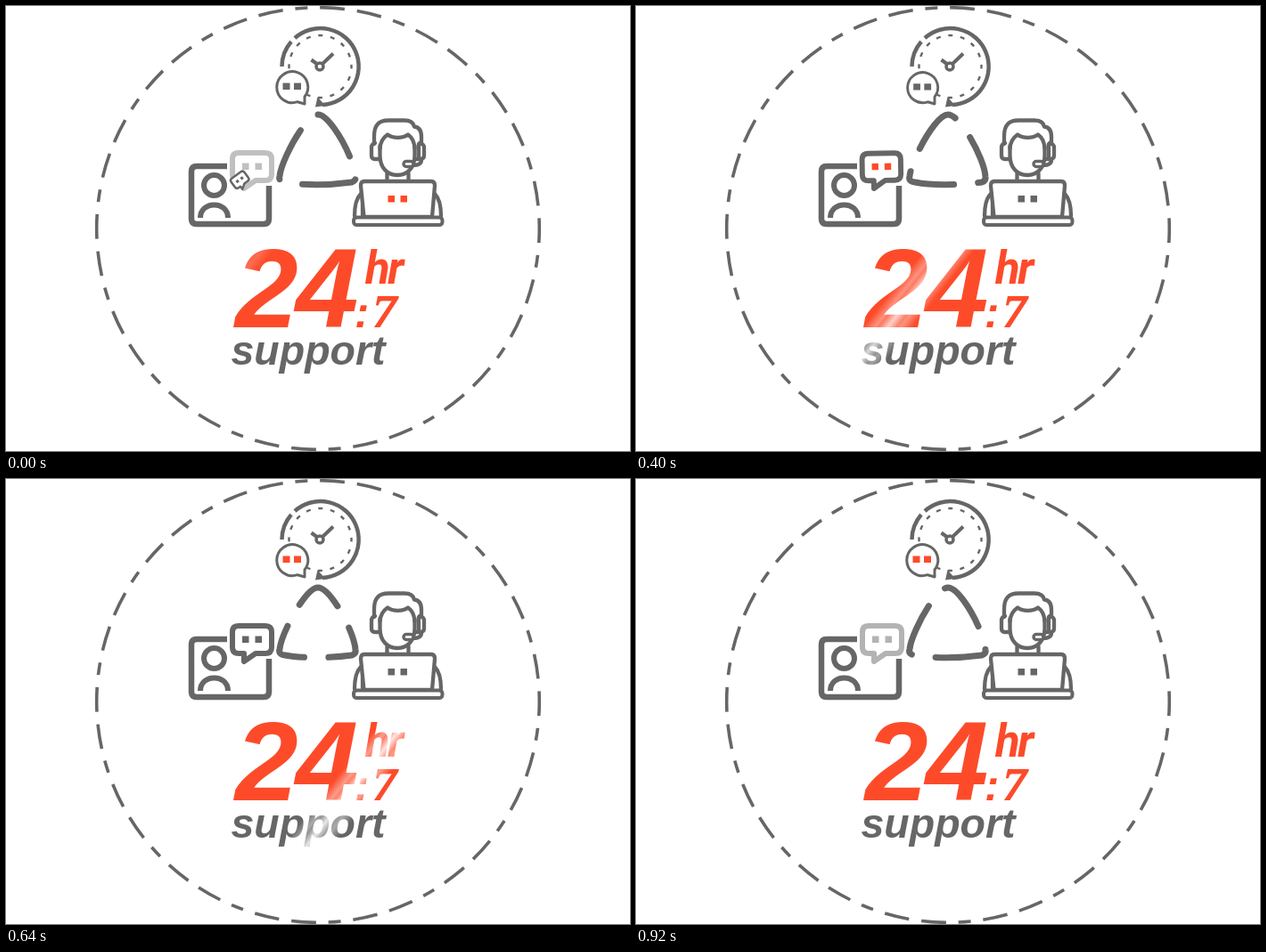
An HTML page that plays this animation: 700x500 px, repeating every 960 ms.

```html
<!DOCTYPE html>
<html lang="en">
<head>
<meta charset="utf-8">
<title>24hr support</title>
<style>
  html, body { margin: 0; width: 100%; height: 100%; overflow: hidden; background: #fff; }
  svg { display: block; width: 700px; height: 500px; }
  .line { fill: none; stroke: #666; stroke-linecap: round; stroke-linejoin: round; }
  .flat { stroke-linecap: butt; }
  .paper { fill: #fff; }
  .sans { font-family: "Liberation Sans", Arial, sans-serif; }
  .narrow { font-family: Roboto, sans-serif; }
  .serif { font-family: "Noto Serif", serif; }
  text { font-weight: bold; font-style: italic; fill: #fd4b2a; }
</style>
</head>
<body>
<svg viewBox="0 0 700 500">
  <defs>
    <linearGradient id="shine" gradientUnits="userSpaceOnUse" x1="-17" y1="-13.600" x2="17" y2="13.600">
      <stop offset="0" stop-color="#fff" stop-opacity="0"/>
      <stop offset=".24" stop-color="#fff" stop-opacity=".45"/>
      <stop offset=".32" stop-color="#fff" stop-opacity=".3"/>
      <stop offset=".5" stop-color="#fff" stop-opacity=".85"/>
      <stop offset=".68" stop-color="#fff" stop-opacity=".35"/>
      <stop offset=".76" stop-color="#fff" stop-opacity=".45"/>
      <stop offset="1" stop-color="#fff" stop-opacity="0"/>
    </linearGradient>
    <g id="bubble">
      <path class="line paper" stroke-width="6" d="M261 165H291Q298 165 298 172V189Q298 196 291 196H280L267 205V196H261Q254 196 254 189V172Q254 165 261 165Z"/>
      <path d="M265 176.500h7.500v7.500h-7.500zM279.500 176.500h7.500v7.500h-7.500z"/>
    </g>
  </defs>

  <circle id="ring" class="line flat" cx="350" cy="250" r="248.300" stroke-width="3.600"
    pathLength="1568" stroke-dasharray="28 14 28 14 14 14" transform="rotate(-91.100 350 250)" stroke-dashoffset="-7"/>

  <!-- clock -->
  <g class="line flat">
    <path stroke-width="4.500" d="M309.500 68A43 43 0 0 1 320 40M324 36A43 43 0 1 1 355 111"/>
    <circle cx="352.500" cy="68" r="35" stroke-width="2.400" stroke-dasharray="5 8.745" stroke-dashoffset="2.500"/>
    <path stroke-width="4" d="M349.500 65.500L342.500 60.500M355 65L367 53.500"/>
    <circle cx="352" cy="68" r="4" stroke-width="3.500"/>
  </g>
  <path fill="#666" d="M349.500 102L347 113.500L358 112Z"/>
  <g id="chat">
    <path class="line paper" stroke-width="3" d="M327 107.700A17.500 17.500 0 1 1 335 102V110Z"/>
    <path id="chatDots" d="M310.500 86.500h8v7.500h-8zM323 86.500h8v7.500h-8z"/>
  </g>

  <path id="loop" class="line" stroke-width="7" pathLength="300" stroke-dasharray="69 31"
    d="M350 122C364 122 391 172 392 192Q393 196 388 198C366 201 333 202 313 198Q305 197 307 191C309 173 336 122 350 122Z"/>

  <!-- contact card -->
  <g class="line flat" stroke-width="6.500">
    <path d="M248 180H214Q208 180 208 186V239Q208 245 214 245H289Q295 245 295 239V202"/>
    <circle cx="233.500" cy="201.500" r="11.500" stroke-width="6"/>
    <path stroke-width="6" d="M218 238C218 218.500 249 218.500 249 238"/>
  </g>
  <use id="oldBubble" href="#bubble" fill="#666"/>
  <use id="newBubble" href="#bubble"/>

  <!-- agent -->
  <g class="line" stroke-width="4.300">
    <path d="M413 155V146C413 133 419 128.500 429 128.500H447C453 128.500 457 131 458 135.500C463 136 466 140 466 147V155"/>
    <path d="M419.500 160C420 152 423 148 428 144.500C434 149 445 149 451 144.500C456 148 458 152 458.500 160"/>
    <path d="M419.500 157V168C419.500 182 428 190 439 190C450 190 458.500 182 458.500 168V157"/>
    <path d="M414 154Q410 155 410 159V168Q410 172 414 172H419M464 154Q469 155 469 159V168Q469 172 464 172H459M463 155V171"/>
    <path d="M466 173C466 177 462 179 456 179M427.500 188V196M451.500 188V196"/>
    <rect class="paper" x="446" y="174.500" width="11" height="6" rx="3" stroke-width="3.500"/>
    <path d="M398 211C393 216 391 224 391 236M481 211C486 216 488 224 488 236M400 223V235"/>
    <path class="paper" d="M402 197H477Q481 197 481 202L478 237H401.500L398 202Q398 197 402 197Z"/>
    <rect class="paper" x="390" y="237.500" width="99.500" height="8.500" rx="3.500" stroke-width="4"/>
  </g>
  <path id="screenDots" d="M428.500 213h7.500v7.500h-7.500zM442.500 213h7.500v7.500h-7.500z"/>

  <text class="sans" x="257" y="361" font-size="127" letter-spacing="-3">24</text>
  <text class="narrow" x="403" y="312" font-size="51" letter-spacing="-2.500">hr</text>
  <text class="sans" x="391" y="361" font-size="49">:</text>
  <text class="serif" x="410" y="361" font-size="50">7</text>
  <text class="sans" x="252.500" y="403" font-size="46.500" style="fill:#666">support</text>
  <rect id="glint" x="246" y="266" width="226" height="150" fill="url(#shine)"/>
</svg>
<script>
const LOOP = 960, STEP = 40, GRAY = '#666', RED = '#fd4b2a';
const $ = id => document.getElementById(id);
const set = (id, name, value) => $(id).setAttribute(name, value);
const clamp = (v, lo, hi) => Math.min(hi, Math.max(lo, v));

// time, place (x + SLANT * y) and strength of the light band
const SLANT = .8;
const band = [[0, 492, .4], [160, 506, .5], [320, 541, .8], [480, 601, .95], [640, 667, 1], [960, 790, 1]];

function sample(table, t) {
  const i = table.findIndex(row => row[0] > t);
  const a = table[i - 1], b = table[i], k = (t - a[0]) / (b[0] - a[0]);
  return a.map((v, n) => v + (b[n] - v) * k);
}

function draw(t) {
  const turn = Math.floor(t / 320);
  ['screenDots', 'newBubble', 'chatDots'].forEach((id, i) => set(id, 'fill', i === turn ? RED : GRAY));

  set('loop', 'stroke-dashoffset', -100 * t / LOOP);

  // the fresh bubble grows from its tail while the previous one fades
  const rest = (1 - clamp(t / 480, 0, 1)) ** 2;
  set('newBubble', 'transform',
    `translate(265 207) rotate(${-36 * rest}) scale(${1 - .58 * rest}) translate(-265 -207)`);
  const fade = age => clamp(1 - (age - 680) / 470, .07, 1);
  set('newBubble', 'opacity', fade(t));
  set('oldBubble', 'opacity', t < 400 ? fade(t + LOOP) : 0);

  const dip = t < 640 ? Math.sin(Math.PI * t / 640) : 0;
  set('chat', 'transform', `translate(335 110) scale(${1 - .03 * dip}) translate(-335 -110)`);

  const [, place, power] = sample(band, t);
  const x = place / (1 + SLANT * SLANT);
  set('shine', 'gradientTransform', `translate(${x} ${x * SLANT})`);
  set('glint', 'opacity', power);
}

const start = performance.now();
function tick() {
  const t = (performance.now() - start) % LOOP;
  draw(Math.floor(t / STEP) * STEP);
  requestAnimationFrame(tick);
}
tick();
</script>
</body>
</html>
```
